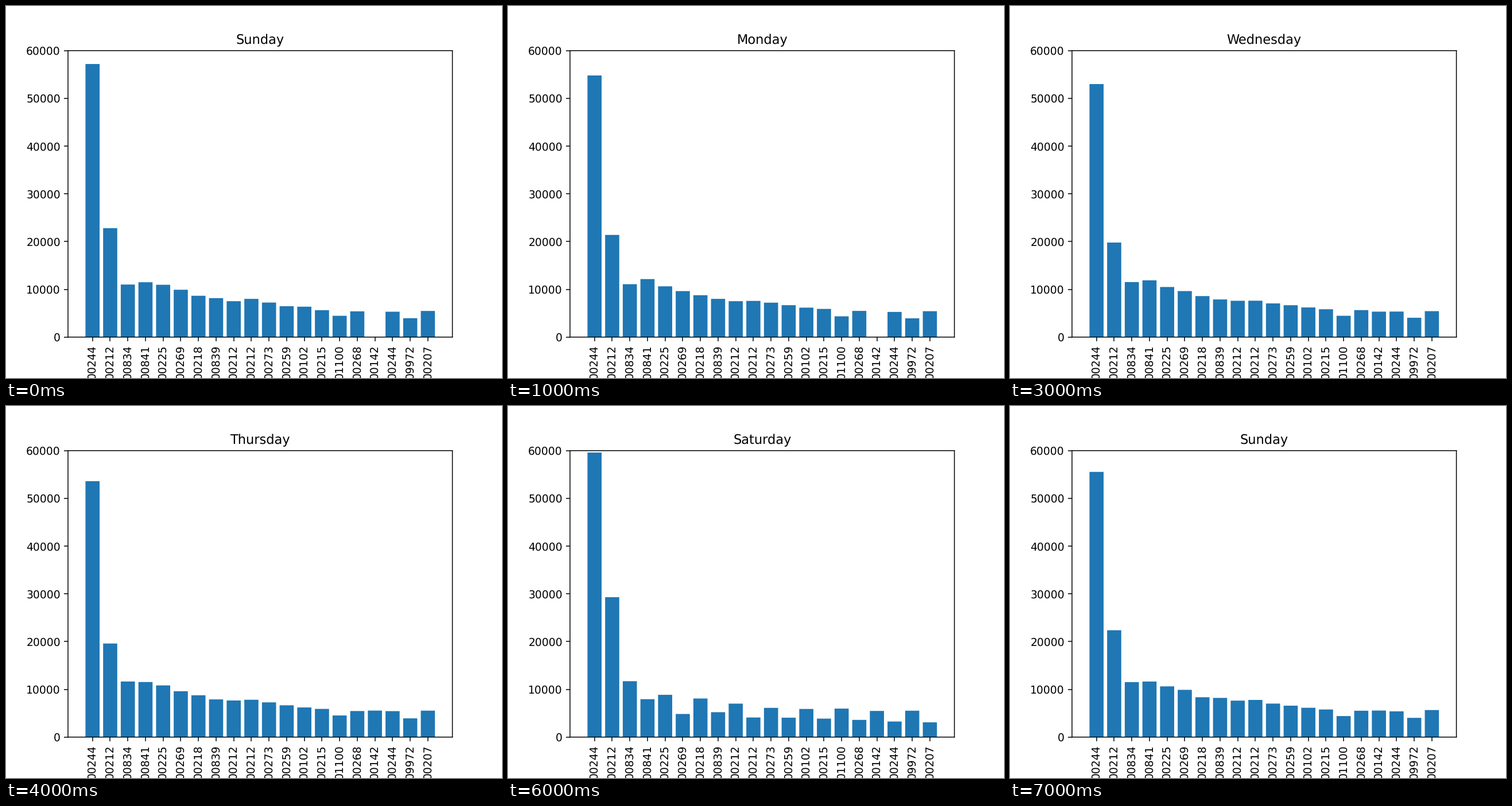
A matplotlib script for the animation above (8000 ms loop, 864 by 648 pixels).

```python
import numpy as np
import matplotlib.pyplot as plt
from matplotlib.animation import FuncAnimation

# Unsnapped edges and unhinted glyphs give soft, evenly scaled drawing
plt.rcParams.update({"font.family": "DejaVu Sans",
                     "text.hinting": "none",
                     "path.snap": False})

LABELS = ("00244 00212 00834 00841 00225 00269 00218 00839 00212 00212 "
          "00273 00259 00102 00215 01100 00268 00142 00244 09972 00207").split()

# Day name with the heights of its two leading bars
DAYS = [("Sunday", 57200, 22810), ("Monday", 54800, 21400),
        ("Tuesday", 52400, 20000), ("Wednesday", 53000, 19800),
        ("Thursday", 53600, 19600), ("Friday", 57250, 26950),
        ("Saturday", 59600, 29300), ("Sunday", 55550, 22380)]

LATE_BAR, LATE_START = 16, 3  # this bar is empty before Wednesday

x = np.arange(len(LABELS))


def usual_tail():
    """A steady decline with a few dips near the end."""
    return np.interp(x, [2, 3, 6, 8, 9, 10, 13, 14, 15, 17, 18, 19],
                     [11320, 11830, 8600, 7500, 7800, 7100,
                      5800, 4400, 5500, 5300, 4000, 5500])


def zigzag_tail():
    """A lower decline in which tall and short bars alternate."""
    trend = np.interp(x, [2, 5, 6, 9, 19], [10700, 5900, 6900, 5300, 4200])
    return trend + 1100 * (-1.0) ** x


def heights(day):
    name, first, second = DAYS[day]
    tail = zigzag_tail() if name in ("Friday", "Saturday") else usual_tail()
    rng = np.random.default_rng(day)
    values = tail * rng.uniform(0.97, 1.03, len(x))
    values[:2] = first, second
    if day < LATE_START:
        values[LATE_BAR] = 0
    return values


fig, ax = plt.subplots(figsize=(6.4, 4.8), dpi=135)
bars = ax.bar(x, heights(0), color="#1f77b4")
ax.set_ylim(0, 60000)
ax.set_xticks(x, LABELS, rotation=90)
title = ax.set_title(DAYS[0][0])


def draw(day):
    for bar, height in zip(bars, heights(day)):
        bar.set_height(height)
    title.set_text(DAYS[day][0])
    return [*bars, title]


anim = FuncAnimation(fig, draw, frames=len(DAYS), interval=1000,
                     repeat=True, repeat_delay=0, blit=False)
plt.show()
```
